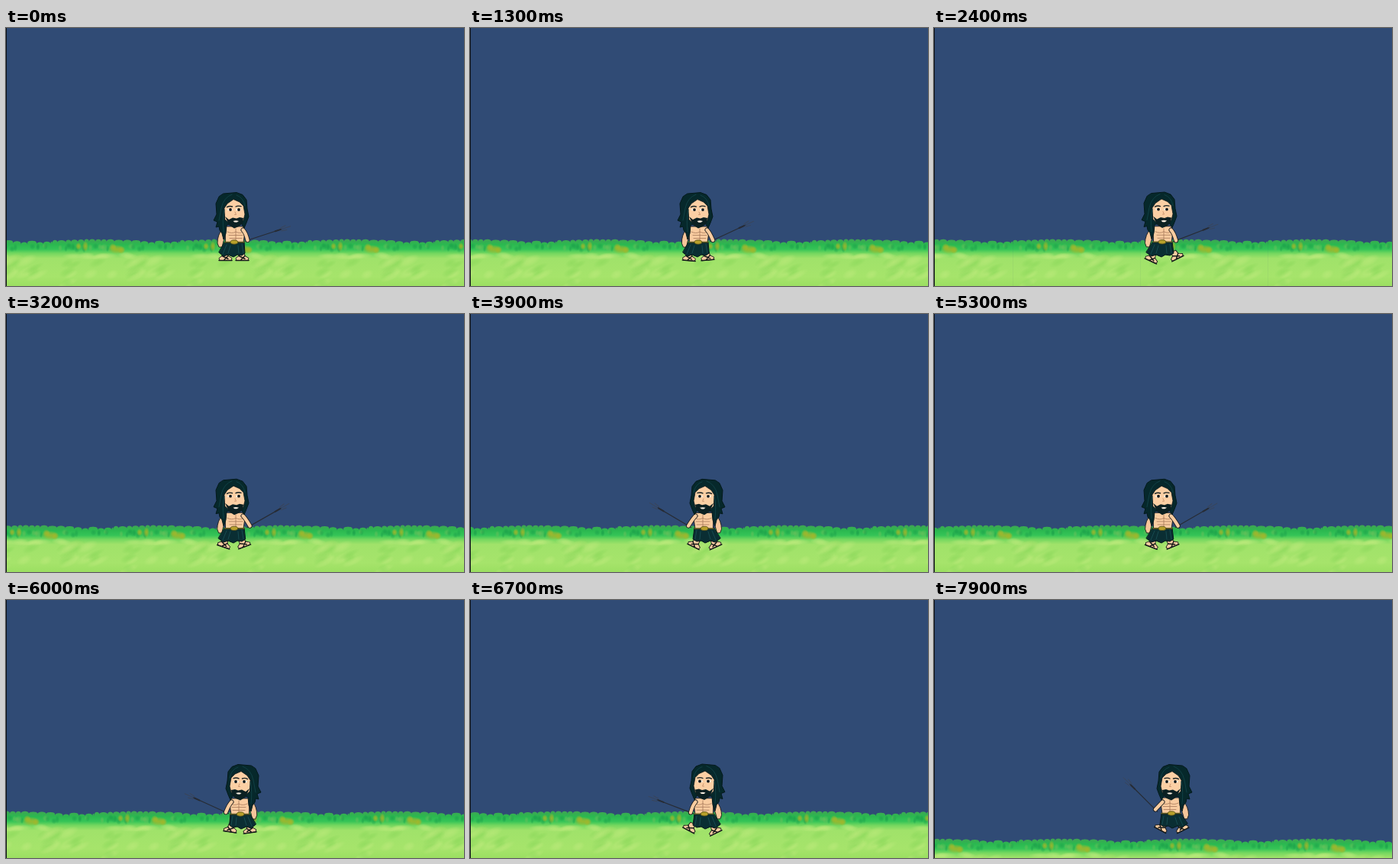
An HTML page that plays this animation: 600 px wide and 338 px high, repeating every 8000 ms.

```html
<!DOCTYPE html>
<html lang="en">
<head>
<meta charset="utf-8">
<title>Walk on the meadow</title>
<style>
  html, body { margin: 0; width: 100%; height: 100%; overflow: hidden; background: #304b75; }
  svg { display: block; width: 100vw; height: 100vh; }
</style>
</head>
<body>
<svg viewBox="0 0 600 338" preserveAspectRatio="none">
  <defs>
    <linearGradient id="grass" gradientUnits="userSpaceOnUse" x1="0" y1="277" x2="0" y2="342">
      <stop offset="0" stop-color="#3fa552"/>
      <stop offset=".1" stop-color="#2bb850"/>
      <stop offset=".2" stop-color="#35c457"/>
      <stop offset=".28" stop-color="#74d75f"/>
      <stop offset=".38" stop-color="#a0e26a"/>
      <stop offset=".75" stop-color="#a6e46b"/>
      <stop offset="1" stop-color="#98dd5f"/>
    </linearGradient>
    <g id="tile"></g>
  </defs>
  <rect width="600" height="338" fill="#304b75"/>
  <g id="ground"></g>
  <rect width="1" height="338" fill="#0b0f16"/>

  <g id="hero" stroke-linejoin="round" stroke-linecap="round">
    <path id="back" d="M283 264Q277 271 277 282L279 287L283 287L285 279L289 268Z" fill="#f6c59a" stroke="#15191a" stroke-width=".9"/>
    <g id="footA"></g>
    <g id="footB"></g>
    <path id="skirt" fill="#0a2e33" stroke="#061719" stroke-width="1"/>
    <path id="folds" fill="none" stroke="#174b50" stroke-width="1"/>
    <g id="torso">
      <path d="M287 260H311L313 267L311 281H288Z" fill="#f9cca0" stroke="#20211f" stroke-width=".9"/>
      <path d="M290 267Q296 270 301 267Q307 270 311 267M292 271.5H310M293 275.5H309M301 263V279" fill="none" stroke="#a5785a" stroke-width=".8"/>
      <path d="M287 280.5H312" stroke="#5f5b22" stroke-width="1.6"/>
      <ellipse cx="299" cy="280.5" rx="5" ry="2.7" fill="#b8a02b" stroke="#4f4917" stroke-width=".8"/>
    </g>
    <g id="staff" fill="none" stroke="#272c35">
      <path d="M-4 0H47" stroke-width="1.2"/>
      <path d="M38 0H45" stroke-width="2"/>
      <path d="M46 -2L53 -3M47 0H59M46 2L53 3" stroke="#3b4558" stroke-width=".9"/>
    </g>
    <path id="armLine" fill="none" stroke="#15191a" stroke-width="6"/>
    <path id="armSkin" fill="none" stroke="#f9cca0" stroke-width="4.4"/>
    <g id="head">
      <path d="M285 217L302 215.5L310 218.5L315 225L316 237L318 247L315 255L312 262L307 254L289 258L288 269L285 277L283 269L280 265L279 260L275 261L277 254L272 252L276 244L275 230L279 221Z" fill="#06282b" stroke="#04191b" stroke-width="1"/>
      <path d="M286 236L290 230L298 224.5L306 228L311 233L313 244L311 252L305 258H294L287 251Z" fill="#fbcfa4" stroke="#10191a" stroke-width=".8"/>
      <path d="M287 247L292 251L297 248.5L302 249.5L306 248L311 249L310 256L305 260L299 262.5L292 258Z" fill="#0b2022"/>
      <path d="M297.5 253Q301 251.6 305 253L302.5 254.6H299.5Z" fill="#f7ede0"/>
      <path d="M289.5 234.6Q293 232.6 296.5 234M301 234Q304 232.4 308 233.6" fill="none" stroke="#142022" stroke-width="1.4"/>
      <path d="M291.5 238H295.5M302.5 238H306.5" fill="none" stroke="#fdf6ec" stroke-width="2.6"/>
      <circle cx="294" cy="238" r="1.9" fill="#111718"/>
      <circle cx="305" cy="238" r="1.9" fill="#111718"/>
      <path d="M300 241L301.5 244.5H299.5" fill="none" stroke="#c08c68" stroke-width=".8"/>
      <path d="M296 218Q285 222 282 236L279 252M302 219Q311 222 313 233M286 238Q283 250 285 267" fill="none" stroke="#124348" stroke-width=".9"/>
    </g>
  </g>
</svg>
<script>
const LOOP = 8000, STEP = 100, PERIOD = 167;
const $ = id => document.getElementById(id);
const clamp = v => Math.max(0, Math.min(1, v));

function make(parent, name, attrs) {
  const node = document.createElementNS("http://www.w3.org/2000/svg", name);
  for (const key in attrs) node.setAttribute(key, attrs[key]);
  parent.append(node);
  return node;
}

function seeded(seed) {
  return () => (seed = (seed * 16807) % 2147483647) / 2147483647;
}

function track(keys, t) {
  let i = 1;
  while (i < keys.length - 1 && t > keys[i][0]) i++;
  const [t0, a] = keys[i - 1], [t1, b] = keys[i];
  return a + (b - a) * clamp((t - t0) / (t1 - t0));
}

// Soft round brush marks are shared radial gradients.
function brush(id, color, strength) {
  const g = make(document.querySelector("defs"), "radialGradient", { id });
  make(g, "stop", { offset: 0, "stop-color": color, "stop-opacity": strength });
  make(g, "stop", { offset: .5, "stop-color": color, "stop-opacity": strength * .65 });
  make(g, "stop", { offset: 1, "stop-color": color, "stop-opacity": 0 });
}

function dab(cx, cy, rx, ry, id, tilt = 0) {
  make($("tile"), "ellipse", {
    cx, cy, rx, ry, fill: `url(#${id})`, transform: `rotate(${tilt} ${cx} ${cy})`
  });
}

function buildGround() {
  const rnd = seeded(4127);
  brush("pale", "#bdea7c", .6);
  brush("leaf", "#86d657", .5);
  brush("deep", "#1ba04a", .6);
  brush("tip", "#6cc05a", .6);
  brush("gold", "#a5b62a", .9);

  let x = 0, edge = "";
  while (x < PERIOD) {
    const w = Math.min(6 + rnd() * 6, PERIOD - x);
    const top = 278.6 - rnd() * 2.5 + 1.2 * Math.cos((x - 135) / PERIOD * 2 * Math.PI);
    const low = top + 3 + rnd() * 1.5;
    edge += `L${x.toFixed(1)} ${low.toFixed(1)}C${x.toFixed(1)} ${top.toFixed(1)} ${(x + w).toFixed(1)} ${top.toFixed(1)} ${(x + w).toFixed(1)} ${low.toFixed(1)}`;
    x += w;
  }
  make($("tile"), "path", {
    d: `M0 400L0 283${edge}L${PERIOD + .5} 283V400Z`, fill: "url(#grass)"
  });

  for (let i = 0; i < 26; i++)
    dab(6 + rnd() * 155, 284 + rnd() * 7, 2 + rnd() * 3, 3 + rnd() * 3, i % 3 ? "deep" : "tip");
  for (let i = 0; i < 9; i++)
    dab(18 + rnd() * 131, 297 + rnd() * 5, 10 + rnd() * 8, 3 + rnd() * 3, "pale");
  for (let i = 0; i < 24; i++)
    dab(18 + rnd() * 131, 303 + rnd() * 34, 8 + rnd() * 9, 4 + rnd() * 4, i % 2 ? "pale" : "leaf", -25);

  // The larger dry patch sits at x = 84 in each tile.
  dab(84, 290, 12, 6, "gold");
  dab(79, 287, 5, 5, "gold");
  dab(90, 291, 5, 5, "gold");
  dab(43, 286, 4, 7, "gold");
  dab(34, 286, 4, 5, "gold");

  for (let i = 0; i < 6; i++) make($("ground"), "use", { href: "#tile", x: i * PERIOD });
}

function buildFoot(id) {
  const foot = $(id);
  make(foot, "path", {
    d: "M-4 -8H3L4 -3L9 0L8 3H-7L-8 0L-4 -3Z",
    fill: "#f9cca0", stroke: "#14191a", "stroke-width": .9
  });
  make(foot, "path", {
    d: "M-8 3H9M-4 -3L4 1M4 -3L-1 2", fill: "none", stroke: "#14191a", "stroke-width": 1.5
  });
}

const scroll = [[0, 145], [600, 145], [1300, 31], [3200, -276], [3900, -391],
  [5053, -202], [5300, -242], [5830, -329], [6700, -186], [7900, 28]];
const stride = [[0, -.25], [600, -.25], [1300, .97], [3200, 4.13], [4600, 6.25],
  [5300, 7.35], [6700, 9.75], [7900, 11.25]];
const turns = [3900, 5053, 5830];

function place(id, x, y, turn) {
  $(id).setAttribute("transform", `translate(${x} ${y}) rotate(${turn})`);
}

function draw(t) {
  const jump = t < 7500 ? 0 : 1 - ((7900 - t) / 400) ** 2;
  const walking = clamp((t - 500) / 200);
  const swing = Math.sin(track(stride, t) * 2 * Math.PI) * walking;
  const spread = Math.abs(swing);
  const left = turns.filter(time => t >= time).length % 2 === 1;

  const offset = (((track(scroll, t) - 84) % PERIOD) + PERIOD) % PERIOD - PERIOD;
  place("ground", offset.toFixed(2), (36 * jump).toFixed(2), 0);
  $("hero").setAttribute("transform",
    left ? `translate(${606 + 4 * jump} 0) scale(-1 1)` : "");

  const bob = (swing * .7 + .2 * walking) * (1 - jump);
  place("head", 0, bob, 0);
  place("torso", 0, bob * .5 - jump, 0);
  $("back").setAttribute("transform", `rotate(${4 * spread - 2 * walking} 285 264)`);

  const rise = 3.5 * jump;
  place("footA", 287 - 2.5 * spread, 301.5 + spread - rise, 26 * spread);
  place("footB", 309 + 6 * spread - 3 * swing, 301.5 - .5 * spread + 1.5 * swing - rise, -28 * spread);

  const l = 279 - spread, r = 313 + spread, hem = 298 - jump;
  $("skirt").setAttribute("d",
    `M287 280H312L${r} ${hem - 3}L309 ${hem}L303 ${hem - 1}L298 ${hem + 2}L291 ${hem - 1}L285 ${hem + 1}L${l} ${hem - 4}Z`);
  $("folds").setAttribute("d",
    `M289 284L284 ${hem - 2}M294 285L291 ${hem - 3}M304 285L305 ${hem - 3}M309 283L311 ${hem - 3}`);

  const hx = 316.5 + 1.5 * swing + 2 * walking, hy = 278 - .5 * swing - 3 * jump;
  const arm = `M310.5 264.5Q314 268 ${hx} ${hy}`;
  $("armLine").setAttribute("d", arm);
  $("armSkin").setAttribute("d", arm);
  place("staff", hx, hy, -(18 + 8 * walking + 5 * swing + 14 * jump));
}

buildGround();
buildFoot("footA");
buildFoot("footB");

const start = performance.now();
function frame() {
  const elapsed = (performance.now() - start) % LOOP;
  draw(Math.floor(elapsed / STEP) * STEP);
  requestAnimationFrame(frame);
}
frame();
</script>
</body>
</html>
```
